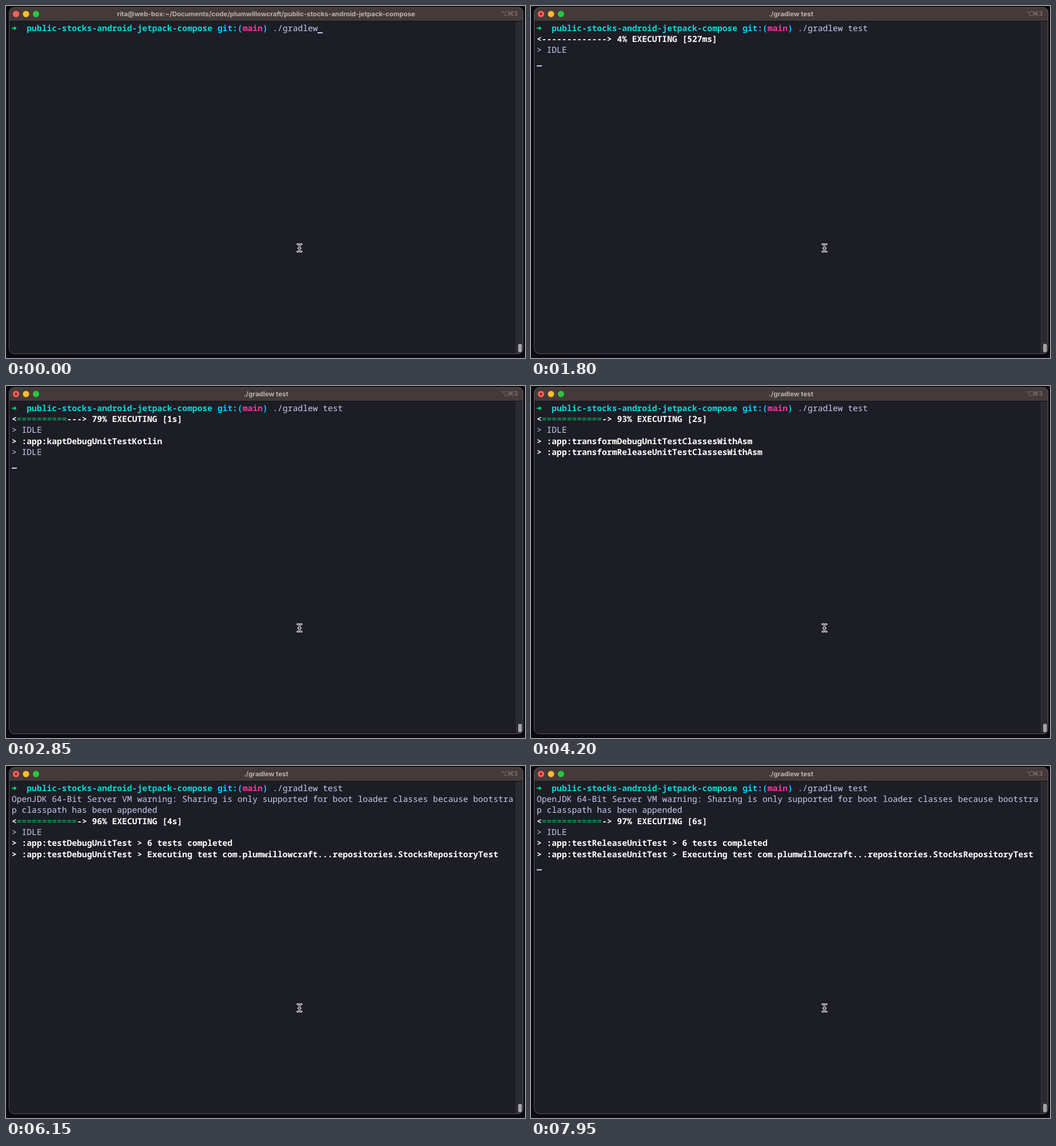
Write an HTML page that moves like this. It is 908x617 px and loops after 8000 ms.

```html
<!DOCTYPE html>
<html lang="en">
<head>
<meta charset="utf-8">
<title>Terminal</title>
<style>
  html, body { margin: 0; width: 100%; height: 100%; overflow: hidden; background: #0b0a10; }
  svg { display: block; }
  text { white-space: pre; text-rendering: geometricPrecision; }
  #screen { font: 14.63px "Noto Sans Mono", monospace; fill: #cbcbf0; }
  #screen .bold, #screen .path, #screen .git, #screen .branch { font-weight: 700; }
  #screen .bold { fill: #fff; }
  #screen .path { fill: #00dcd6; }
  #screen .git { fill: #00cbff; }
  #screen .branch { fill: #ff3399; }
  #screen .done { fill: #00d364; }
  .title { font: 700 11.5px Inter, sans-serif; fill: #b9b3b4; }
  .keys { font: 500 11px Inter, sans-serif; fill: #82787a; }
</style>
</head>
<body>
<svg width="908" height="617" viewBox="0 0 908 617">
  <clipPath id="window"><rect x="6" y="2" width="899" height="608" rx="9"/></clipPath>
  <g clip-path="url(#window)">
    <rect width="908" height="617" fill="#1d1d26"/>
    <rect width="908" height="26" fill="#453a3a"/>
    <rect y="26" width="908" height="1" fill="#111017"/>
    <rect x="892" y="27" width="16" height="590" fill="#2a2a32"/>
    <rect x="892" y="27" width="1" height="590" fill="#35353c"/>
    <rect x="896" y="592" width="6.5" height="15" rx="3.25" fill="#a5a5a8"/>
  </g>
  <rect x="5.5" y="2.5" width="899" height="607" rx="9" fill="none" stroke="#59565b"/>
  <circle cx="17.5" cy="14" r="5.5" fill="#ff5f57"/>
  <circle cx="35" cy="14" r="5.5" fill="#febc2e"/>
  <circle cx="52.5" cy="14" r="5.5" fill="#28c840"/>
  <circle id="busy" cx="17.5" cy="14" r="2" fill="#79120e"/>
  <text id="title" class="title" x="455" y="18" text-anchor="middle"></text>
  <path d="M867 10h3l3.5 7h3M872.5 10h4M881 15.5v-5a1.5 1.5 0 1 0-1.5 1.5h6a1.5 1.5 0 1 0-1.5-1.5v5a1.5 1.5 0 1 0 1.5-1.5h-6a1.5 1.5 0 1 0 1.5 1.5z" fill="none" stroke="#82787a"/>
  <text class="keys" x="888.5" y="17">3</text>
  <path d="M10 38h4.2v-3l4.6 4-4.6 4v-3H10z" fill="#00d364"/>
  <g id="screen"></g>
  <rect id="cursor" width="9" height="2" fill="#cbcbf0"/>
  <g fill="none" stroke-linecap="round">
    <path id="beam" d="M510 417.500q3 0 3.500 2.500q.5-2.500 3.500-2.500M513.500 420v8M510 430.500q3 0 3.500-2.500q.5 2.500 3.500 2.500M511.500 424.500h4" stroke="#e8e8ee" stroke-width="3"/>
    <use href="#beam" id="core"/>
    <path d="M510 417.500q3 0 3.500 2.500q.5-2.500 3.500-2.500M513.500 420v8M510 430.500q3 0 3.500-2.500q.5 2.500 3.500 2.500M511.500 424.500h4" stroke="#15151b"/>
  </g>
</svg>
<script>
const LOOP = 8000, TICK = 150, CELL = 8.78, LEFT = 10;
const BUILD_START = 1273, WARNING_AT = 5250;
const $ = id => document.getElementById(id);
const screen_ = $('screen');

const PROJECT = 'public-stocks-android-jetpack-compose';
const SHELL_TITLE = 'rita@web-box:~/Documents/code/plumwillowcraft/' + PROJECT;
const WARNING = [
  'OpenJDK 64-Bit Server VM warning: Sharing is only supported for boot loader classes because bootstra',
  'p classpath has been appended'
];
const DEBUG = ':app:testDebugUnitTest', RELEASE = ':app:testReleaseUnitTest';
const RUNNING = ' > Executing test com.plumwillowcraft...repositories.StocksRepositoryTest';
const resolve = (task, variant) =>
  `${task} > Resolve files of configuration ':app:${variant}UnitTestRuntimeClasspath'`;

// [time, command typed after ./gradlew]
const typing = [[0, ''], [300, ' t'], [450, ' tes'], [600, ' test']];

// [time, percent, phase, worker lines]
const build = [
  [1350, 0, 'INITIALIZING', 'IDLE'],
  [1500, 0, 'CONFIGURING', 'IDLE'],
  [1650, 0, 'EXECUTING', 'IDLE'],
  [1800, 4, 'EXECUTING', 'IDLE'],
  [1950, 36, 'EXECUTING', 'IDLE', ':app:kaptGenerateStubsDebugKotlin', 'IDLE'],
  [2100, 58, 'EXECUTING', 'IDLE', resolve(':app:kaptDebugUnitTestKotlin', 'debug'), 'IDLE'],
  [2400, 72, 'EXECUTING', 'IDLE', resolve(':app:kaptDebugUnitTestKotlin', 'debug'), 'IDLE'],
  [2700, 79, 'EXECUTING', 'IDLE', ':app:kaptDebugUnitTestKotlin', 'IDLE'],
  [3000, 84, 'EXECUTING', 'IDLE', ':app:kaptDebugUnitTestKotlin', ':app:kaptReleaseUnitTestKotlin'],
  [3150, 87, 'EXECUTING', 'IDLE', ':app:compileDebugUnitTestKotlin', ':app:compileReleaseUnitTestKotlin'],
  [4200, 93, 'EXECUTING', 'IDLE', ':app:transformDebugUnitTestClassesWithAsm', ':app:transformReleaseUnitTestClassesWithAsm'],
  [4350, 96, 'EXECUTING', 'IDLE', DEBUG, 'IDLE'],
  [4650, 96, 'EXECUTING', 'IDLE', DEBUG + ' > 0 tests completed', 'IDLE'],
  [4800, 96, 'EXECUTING', 'IDLE', DEBUG + ' > 0 tests completed', DEBUG + RUNNING],
  [4950, 96, 'EXECUTING', 'IDLE', DEBUG + ' > 6 tests completed', DEBUG + RUNNING],
  [6300, 97, 'EXECUTING', 'IDLE', RELEASE, 'IDLE'],
  [6450, 97, 'EXECUTING', 'IDLE', resolve(RELEASE, 'release'), 'IDLE'],
  [6750, 97, 'EXECUTING', 'IDLE', RELEASE, 'IDLE'],
  [7500, 97, 'EXECUTING', 'IDLE', RELEASE + ' > 0 tests completed', 'IDLE'],
  [7800, 97, 'EXECUTING', 'IDLE', RELEASE + ' > 0 tests completed', RELEASE + RUNNING],
  [7950, 97, 'EXECUTING', 'IDLE', RELEASE + ' > 6 tests completed', RELEASE + RUNNING]
];

// The cursor flips at each of these times, starting visible
const blinks = [1350, 1800, 2400, 2850, 3150, 3600, 4200, 4800, 6150, 6750, 7350, 7950];

const current = (steps, t) => steps.filter(step => step[0] <= t).pop();

function put(row, col, string, style = '') {
  const node = document.createElementNS('http://www.w3.org/2000/svg', 'text');
  node.setAttribute('x', LEFT + col * CELL);
  node.setAttribute('y', Math.round(43.8 + 19.3 * row));
  node.setAttribute('class', style);
  node.textContent = string;
  screen_.append(node);
}

function putBuild(row, t, [, percent, phase, ...workers]) {
  const done = Math.floor(percent * 13 / 100), elapsed = t - BUILD_START;
  const clock = elapsed < 1000 ? elapsed + 'ms' : Math.floor(elapsed / 1000) + 's';
  put(row, 0, '<', 'bold');
  put(row, 1, '='.repeat(done), 'done');
  put(row, 1 + done, '-'.repeat(13 - done) + `> ${percent}% ${phase} [${clock}]`, 'bold');
  for (const worker of workers)
    put(++row, 0, ('> ' + worker).slice(0, 99), worker === 'IDLE' ? '' : 'bold');
  return row + 1;
}

function draw(t) {
  const entered = t >= 750, command = './gradlew' + current(typing, t)[1];
  let row = 0, col = 52 + command.length;
  screen_.replaceChildren();
  put(0, 3, PROJECT, 'path');
  put(0, 41, 'git:(', 'git');
  put(0, 46, 'main', 'branch');
  put(0, 50, ')', 'git');
  put(0, 52, command);
  if (entered) {
    row = 1;
    col = 0;
    if (t >= WARNING_AT) for (const line of WARNING) put(row++, 0, line);
    const state = current(build, t);
    if (state) row = putBuild(row, t, state);
  }
  $('title').textContent = entered ? command : SHELL_TITLE;
  $('busy').style.display = t >= 1350 ? '' : 'none';
  const cursor = $('cursor');
  cursor.setAttribute('x', Math.floor(LEFT + col * CELL));
  cursor.setAttribute('y', Math.floor(46.75 + 19.25 * row));
  cursor.style.display = blinks.filter(time => time <= t).length % 2 ? 'none' : '';
}

let shown = -1;
function frame() {
  const t = Math.floor(performance.now() % LOOP / TICK) * TICK;
  if (t !== shown) draw(shown = t);
  requestAnimationFrame(frame);
}
frame();
</script>
</body>
</html>
```
